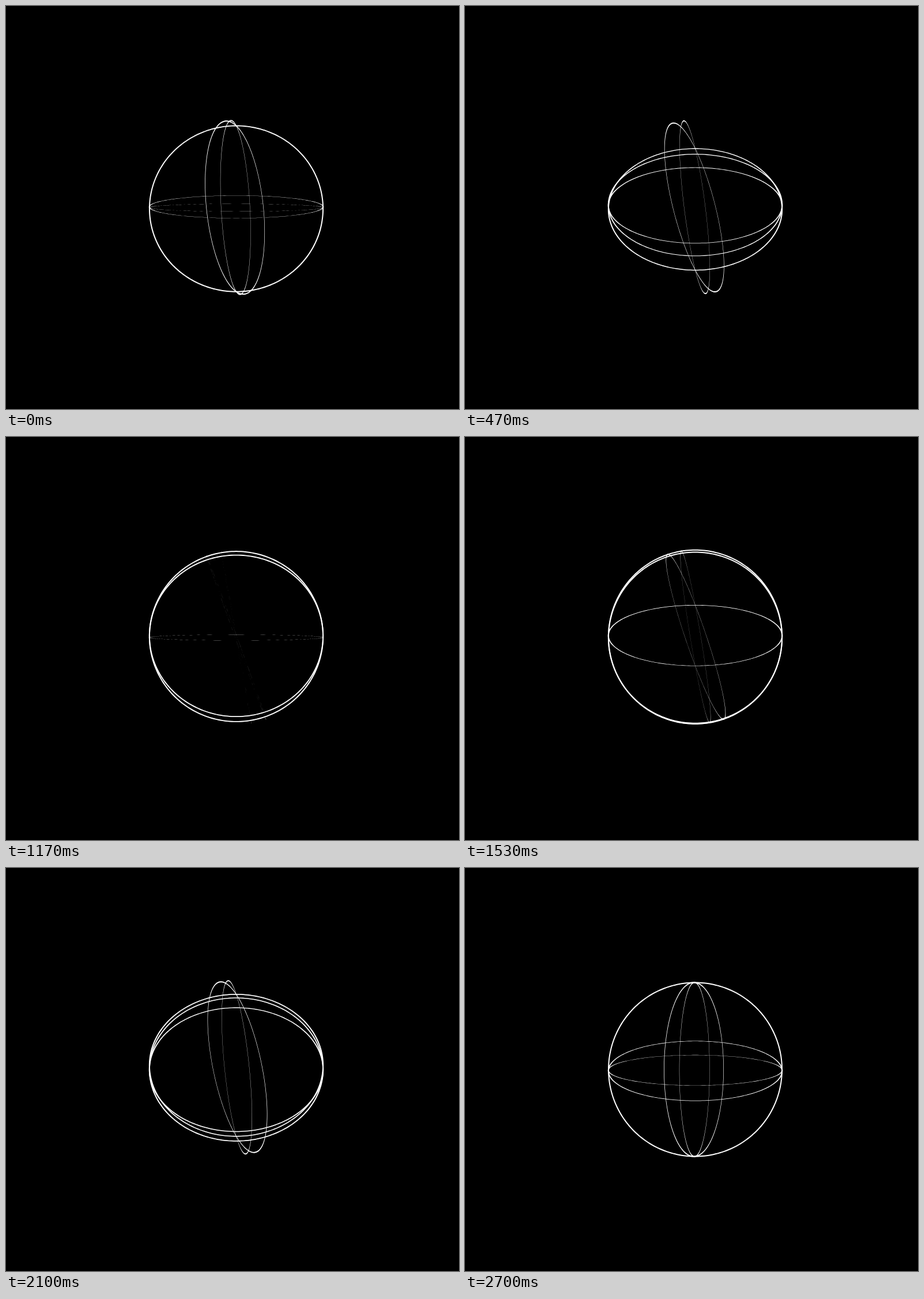
Animation of 786x698 px, one loop 2.73 s. Source, as an HTML page with a canvas:

```html
<!DOCTYPE html>
<html lang="en">
<head>
<meta charset="utf-8">
<title>Rotating rings</title>
<style>
  html, body { margin: 0; width: 100%; height: 100%; overflow: hidden; background: #000; }
  canvas { display: block; }
</style>
</head>
<body>
<canvas id="stage" width="786" height="698"></canvas>
<script>
  const LOOP = 2730, STEPS = 82;        // about 30 poses per second
  const START = 17.5, TURN = 2.018;     // degrees, degrees per pose
  const PIVOT = { x: 399.5, y: 347 };
  const DROP = 2;                       // ring centres lie below the pivot
  const OUTER = 151.5, INNER = 149.5, DEPTH = 2950, POINTS = 240;
  const ctx = document.getElementById('stage').getContext('2d');
  const rad = degrees => degrees * Math.PI / 180;

  const rings = [
    { axis: 'x', tilt: 0 },
    { axis: 'x', tilt: 70 },
    { axis: 'x', tilt: 80 },
    { axis: 'y', tilt: 70 },
    { axis: 'y', tilt: 80 }
  ];

  // Turn a pair of coordinates by an angle.
  function turn(a, b, angle) {
    const cos = Math.cos(angle), sin = Math.sin(angle);
    return [a * cos - b * sin, a * sin + b * cos];
  }

  function project(ring, radius, t, angle) {
    let x = radius * Math.cos(t), y = radius * Math.sin(t), z = 0;
    if (ring.axis === 'x') [y, z] = turn(y, z, rad(ring.tilt));
    else [z, x] = turn(z, x, rad(ring.tilt));
    [y, z] = turn(y + DROP, z, angle);
    const scale = DEPTH / (DEPTH - z);
    return [PIVOT.x + x * scale, PIVOT.y + y * scale];
  }

  function drawRing(ring, angle) {
    ctx.beginPath();
    for (const radius of [OUTER, INNER]) {
      for (let i = 0; i < POINTS; i++) {
        const [x, y] = project(ring, radius, i / POINTS * 2 * Math.PI, angle);
        if (i) ctx.lineTo(x, y); else ctx.moveTo(x, y);
      }
      ctx.closePath();
    }
    ctx.fill('evenodd');
  }

  function draw(now) {
    const time = Math.max(0, now) % LOOP;
    const step = Math.min(STEPS - 1, Math.floor(time * 0.03 + 0.15));
    const angle = rad(Math.min(180, START + TURN * step) % 180);
    ctx.fillStyle = '#000';
    ctx.fillRect(0, 0, 786, 698);
    ctx.fillStyle = '#fff';
    for (const ring of rings) drawRing(ring, angle);
    requestAnimationFrame(draw);
  }
  draw(0);
</script>
</body>
</html>
```
